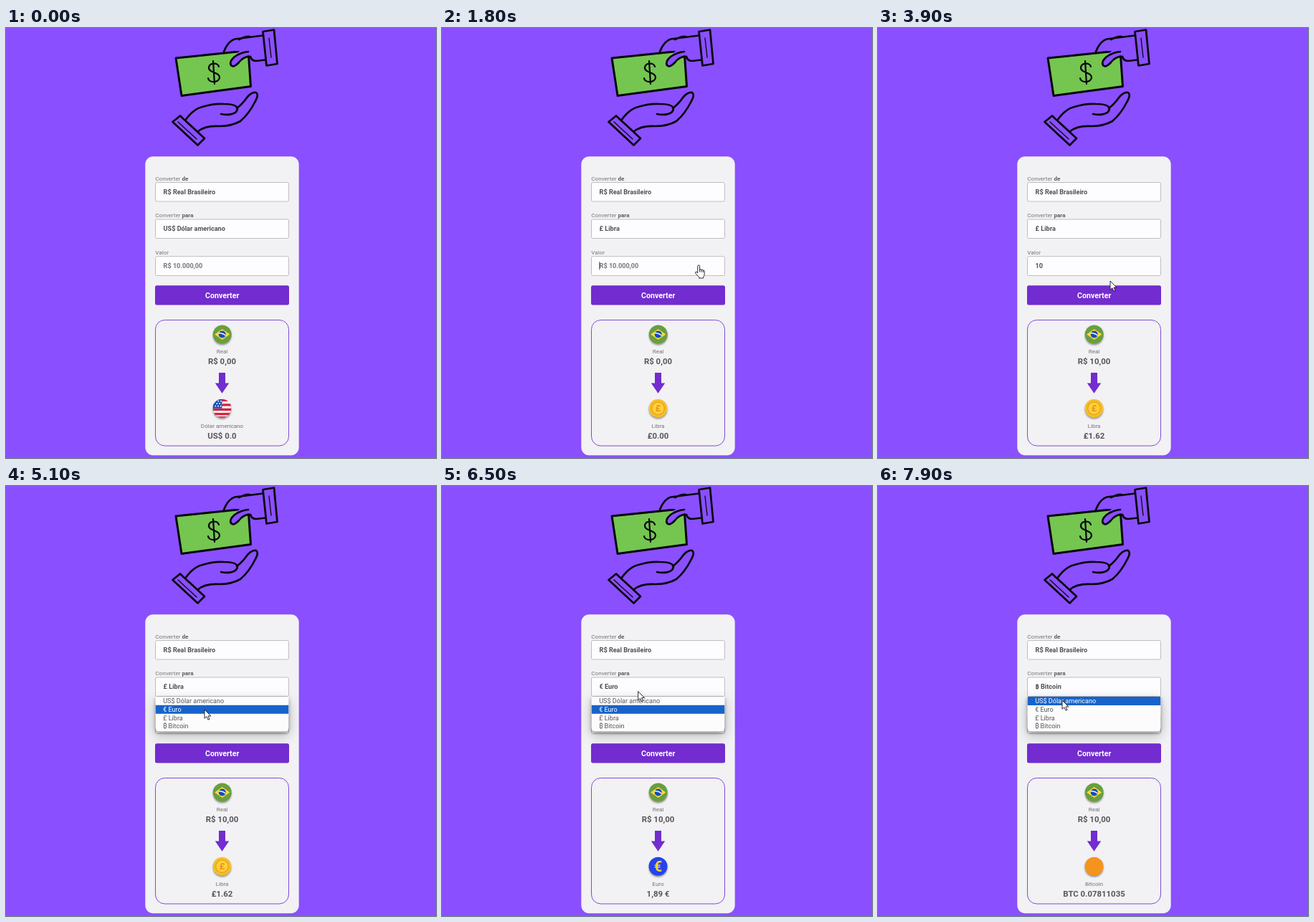
Write an HTML page that moves like this. It is 600 by 600 pixels and loops after 8000 ms.

```html
<!DOCTYPE html>
<html lang="pt-BR">
<head>
<meta charset="utf-8">
<title>Conversor de moedas</title>
<style>
html, body { margin: 0; width: 100%; height: 100%; overflow: hidden; background: #8a4fff; }
svg { display: block; width: 100vw; height: 100vh; }
text { font-family: Roboto, "Noto Sans", "DejaVu Sans", sans-serif; fill: #505052; white-space: pre; }
.label { font-size: 8.1px; fill: #777579; }
.label tspan { font-weight: 700; fill: #5f5d62; }
.value { font-size: 9.1px; font-weight: 700; }
.empty { fill: #77757a; }
.name { font-size: 8.1px; fill: #747277; text-anchor: middle; }
.sum { font-size: 11.4px; font-weight: 700; fill: #58565b; text-anchor: middle; }
.button { font-size: 10.6px; font-weight: 700; fill: #fff; text-anchor: middle; }
.field { fill: #fdfcfe; stroke: #bfbdc1; }
.ink { fill: none; stroke: #08060c; stroke-width: 2.7; stroke-linecap: round; stroke-linejoin: round; }
.skin { fill: #8a4fff; }
.item { font-size: 9.07px; fill: #55565a; }
.item.on { fill: #fff; }
.coin { filter: drop-shadow(0 2px 1.2px rgba(0, 0, 0, .38)); }
.list { filter: drop-shadow(0 2px 2px rgba(0, 0, 0, .35)) drop-shadow(0 5px 8px rgba(0, 0, 0, .24)); }
.pointer { fill: #fff; stroke: #17151a; stroke-width: .9; stroke-linejoin: round; }
</style>
</head>
<body>
<svg viewBox="0 0 600 600">
  <defs>
    <clipPath id="disc"><circle r="13"/></clipPath>
    <clipPath id="globe"><circle r="5"/></clipPath>
    <clipPath id="listShape"><path d="M208.5 294H394.5V337Q394.5 342.5 389 342.5H214Q208.5 342.5 208.5 337Z"/></clipPath>
  </defs>
  <rect width="600" height="600" fill="#8a4fff"/>

  <!-- Hands and banknote -->
  <g class="ink">
    <path d="M237 42L338 31.5L341.5 81.5L245 94.5Z" fill="#74c650" stroke-width="3"/>
    <path d="M297 54C296 48 284 48 283 55C282 63 298 61 298 69C297 77 283 77 282 70M289 46L291 78" stroke-width="2.2"/>
    <path class="skin" stroke="none" d="M305 31Q311 18 319 15L358 10L363 46L345 47L338 38Q332 40 326 47Q320 55 315 53Q310 48 319 39L326 32Z"/>
    <path d="M304 33Q310 18 319 15.5L358 10.5M338 33Q328 34 319 40Q311 47 314 52Q318 56 325 48Q332 39 341 40M341 40Q343 46 349 46L362 44.5M325 16Q335 11 340 12"/>
    <path class="skin" d="M358.5 5L374 2.5L378.5 50L363.5 52.5Z"/>
    <path d="M367 14L370 41" stroke-width="1.3"/>
    <path class="skin" d="M250 129Q261 113 274 110Q290 105 304 106Q321 106 323 112C323 121 309 122 300 120M322 112Q330 106 337 96Q343 89 349 90Q353 93 348 102Q339 120 327 130Q315 137 297 137Q277 136 267 145"/>
    <path class="skin" d="M232.5 131L243 122.5L277 154L267.5 163.5Z"/>
    <path d="M240 131L266 155" stroke-width="1.3"/>
  </g>

  <!-- Form -->
  <rect x="194.3" y="179.3" width="214.4" height="417" rx="11" fill="#f2f1f4"/>
  <text class="label" x="208.3" y="212.8">Converter <tspan>de</tspan></text>
  <text class="label" x="208.3" y="264.2">Converter <tspan>para</tspan></text>
  <text class="label" x="208.3" y="315.9">Valor</text>
  <rect class="field" x="208.5" y="215.5" width="186" height="26.5" rx="2"/>
  <rect class="field" x="208.5" y="267" width="186" height="26.5" rx="2"/>
  <rect class="field" x="208.5" y="318.7" width="186" height="26.8" rx="2"/>
  <text class="value" x="219.6" y="231.9">R$ Real Brasileiro</text>
  <text class="value" x="219.6" y="283.4" id="choice"></text>
  <text class="value" x="219.6" y="335" id="amount"></text>
  <path id="caret" d="M0 326.3V337.3" stroke="#333" stroke-width=".9"/>
  <rect x="208" y="359.3" width="187" height="27.2" rx="2.5" fill="#722ccf"/>
  <text class="button" x="301.7" y="376.7">Converter</text>

  <!-- Result -->
  <rect x="208.5" y="407.5" width="186" height="175.5" rx="13" fill="none" stroke="#7d4bd8"/>
  <g class="coin" transform="translate(301.7 427.5)">
    <circle r="13" fill="#699f3f"/>
    <path d="M-10.5 0L0-7.4L10.5 0L0 7.4Z" fill="#ffda44"/>
    <circle r="5" fill="#164db5"/>
    <path clip-path="url(#globe)" d="M-6-1.5Q0-3 6 2.5" fill="none" stroke="#fff" stroke-width="1.5"/>
  </g>
  <text class="name" x="301.5" y="454.1">Real</text>
  <text class="sum" x="301.5" y="469.3" id="from"></text>
  <path d="M297 481H306V495.5H311.2L301.5 509.8L291.8 495.5H297Z" fill="#722ccf"/>
  <g class="coin" transform="translate(301.5 530.7)">
    <g class="money" clip-path="url(#disc)">
      <circle r="13" fill="#f3f0f3"/>
      <path d="M-13-11.4H13M-13-4.9H13M-13 1.6H13M-13 8H13M-13 13H13" stroke="#d8233b" stroke-width="3.2"/>
      <path d="M-13-13H0V0H-13Z" fill="#1553b4"/>
      <path d="M-10-3H0M-8-6.5H0M-6-10H0" stroke="#fff" stroke-width="1.7" stroke-dasharray="1.7 2"/>
    </g>
    <g class="money">
      <circle r="13" fill="#2443ed"/>
      <text y="7.2" text-anchor="middle" style="font-size:20px;font-weight:700;fill:#ffd52e">€</text>
    </g>
    <g class="money">
      <circle r="12.4" fill="#f4bd24" stroke="#f6c431" stroke-width="1.2" stroke-dasharray="2 1"/>
      <circle r="8.7" fill="#ffd23a" stroke="#e99c1b" stroke-width="1.2"/>
      <text y="4.7" text-anchor="middle" style="font-size:13px;font-weight:700;fill:#e8941c">£</text>
    </g>
    <g class="money"><circle r="13" fill="#f5931d"/></g>
  </g>
  <text class="name" x="301.5" y="557.5" id="toName"></text>
  <text class="sum" x="301.5" y="572.8" id="to"></text>

  <!-- Open list -->
  <g id="list">
    <g class="list"><path d="M208.5 294H394.5V337Q394.5 342.5 389 342.5H214Q208.5 342.5 208.5 337Z" fill="#fcfcfd"/></g>
    <rect id="mark" x="208.5" width="186" height="12" fill="#1763cb" clip-path="url(#listShape)"/>
    <text class="item" x="219.2" y="303.2"></text>
    <text class="item" x="219.2" y="314.8"></text>
    <text class="item" x="219.2" y="326.6"></text>
    <text class="item" x="219.2" y="338.2"></text>
  </g>
  <g id="cursor">
    <path id="arrow" class="pointer" d="M0 0V12.3L2.9 9.7L5 14.2L7 13.3L5 9H8.9Z"/>
    <path id="hand" class="pointer" d="M-1.3 10V1.3A1.4 1.4 0 0 1 1.5 1.3V6Q3.2 5.2 3.9 6.5Q5.5 5.7 6.2 7Q8 6.6 8.1 8.3V12Q8 15 6.6 16.4V18H.6V16.5L-4.5 11Q-4.7 9-3 9.2L-1.3 10.8ZM1.5 6V9.5M3.9 6.5V9.8M6.2 7V10"/>
  </g>
</svg>
<script>
const $ = id => document.getElementById(id);
const LOOP = 8000, STEP = 100;

const coins = [
  { sign: "US$", name: "Dólar americano", sum: "US$ 0.0" },
  { sign: "€", name: "Euro", sum: "1,89 €" },
  { sign: "£", name: "Libra", sum: "£1.62", zero: "£0.00" },
  { sign: "₿", name: "Bitcoin", sum: "BTC 0.07811035" }
];
const title = c => c.sign + " " + c.name;

// Each entry holds from its time on.
const chosen = [[0, 0], [1400, 2], [5400, 1], [6900, 3]];
const typed = [[0, ""], [2300, "1"], [2500, "10"]];
const opened = [[0, false], [900, true], [1400, false], [4400, true], [5400, false],
  [6400, true], [6900, false], [7500, true]];
const CONVERT = 3200;

// Pointer path: time, x, y
const path = [
  [200, 480, 455], [500, 380, 335], [800, 310, 280], [950, 309, 283], [1250, 316, 321],
  [1400, 318, 322], [1700, 358, 331], [2600, 360, 331], [2950, 326, 367], [3600, 325, 367],
  [3900, 324, 353], [4250, 292, 281], [4500, 290, 283], [4800, 282, 324], [5100, 277, 312],
  [5400, 275, 312], [5700, 271, 324], [5900, 271, 321], [6250, 274, 281], [6450, 274, 283],
  [6750, 269, 331], [6900, 268, 331], [7200, 264, 302], [7350, 260, 282], [7600, 259, 283],
  [7900, 257, 299]
];
const targets = [[215, 242], [267, 294], [318, 346], [359, 387]];

const items = document.querySelectorAll(".item");
const moneys = document.querySelectorAll(".money");
items.forEach((el, i) => el.textContent = title(coins[i]));

const at = (steps, t) => steps.filter(s => s[0] <= t).pop()[1];
const show = (el, on) => el.style.display = on ? "" : "none";

function pointerAt(t) {
  const i = path.findIndex(p => p[0] > t);
  if (i < 0) return path[path.length - 1].slice(1);
  const a = path[Math.max(0, i - 1)], b = path[i];
  let k = Math.max(0, (t - a[0]) / (b[0] - a[0]));
  k = k * k * (3 - 2 * k);
  return [a[1] + (b[1] - a[1]) * k, a[2] + (b[2] - a[2]) * k];
}

function draw(t) {
  const pick = at(chosen, t), coin = coins[pick], text = at(typed, t);
  const open = at(opened, t), done = t >= CONVERT;
  const [x, y] = pointerAt(t);

  $("choice").textContent = title(coin);
  $("amount").textContent = text || "R$ 10.000,00";
  $("amount").classList.toggle("empty", !text);
  $("from").textContent = done ? "R$ 10,00" : "R$ 0,00";
  $("toName").textContent = coin.name;
  $("to").textContent = !done && coin.zero || coin.sum;
  moneys.forEach((el, i) => show(el, i === pick));

  show($("caret"), t >= 1800 && t < CONVERT && (t - 1800) % 1000 < 500);
  $("caret").setAttribute("transform", `translate(${219.8 + text.length * 5.25})`);

  show($("list"), open);
  const row = y < 294 ? pick : Math.min(3, Math.floor((y - 294) / 11.8));
  $("mark").setAttribute("y", 294 + row * 11.8);
  items.forEach((el, i) => el.classList.toggle("on", i === row));

  const over = !open && x > 208 && x < 395 && targets.some(([a, b]) => y > a && y < b);
  show($("cursor"), t >= path[0][0]);
  show($("hand"), over);
  show($("arrow"), !over);
  $("cursor").setAttribute("transform", `translate(${x} ${y})`);
}

function tick() {
  const t = performance.now() % LOOP;
  draw(Math.floor(t / STEP) * STEP);
  requestAnimationFrame(tick);
}
tick();
</script>
</body>
</html>
```
